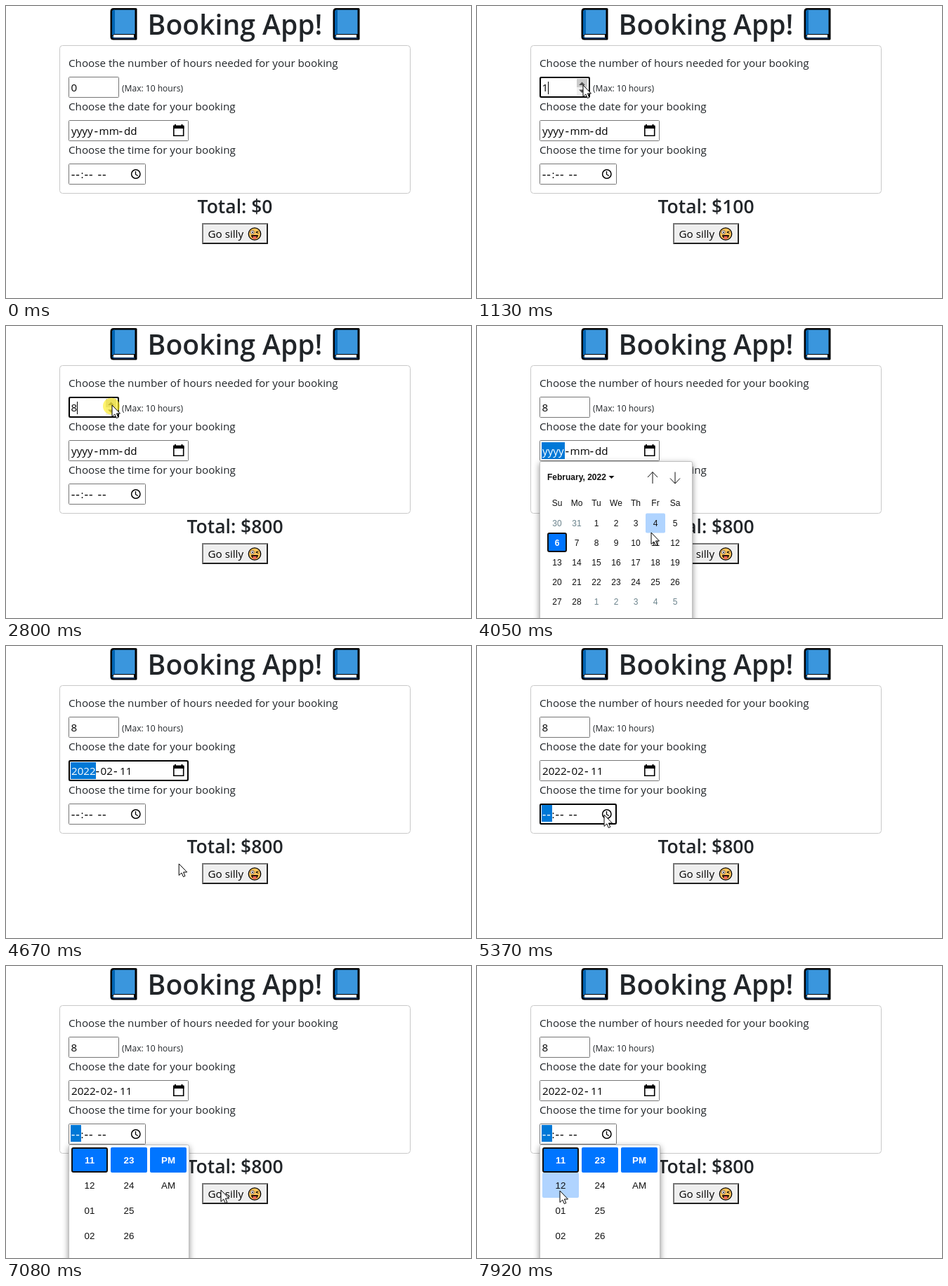
An HTML page for the animation above (7990 ms loop, 662 px wide and 417 px high).

```html
<!DOCTYPE html>
<html lang="en">
<head>
<meta charset="utf-8">
<title>Booking App</title>
<style>
  html, body { margin: 0; width: 100%; height: 100%; overflow: hidden; background: #fff; }
  svg { display: block; width: 100%; height: 100%; }
  text { font: 15.2px "Open Sans", "Noto Sans", sans-serif; fill: #212529; white-space: pre; }
  .head { font-weight: 600; text-anchor: middle; }
  .field { fill: #fff; stroke: #767676; }
  .ring { fill: none; stroke: #000; stroke-width: 2; }
  .value { fill: #000; }
  .picked { fill: #fff; }
  .dash { font-size: 17.5px; letter-spacing: .8px; }
  .pop text { font: 12px "Liberation Sans", Arial, sans-serif; fill: #101010; text-anchor: middle; }
  .pop .month { font-weight: bold; text-anchor: start; }
  .pop .dim { fill: #6b838c; }
  .pop .on { fill: #fff; font-weight: bold; }
  .pop .clock { font-size: 13.33px; }
</style>
</head>
<body>
<svg viewBox="0 0 662 417" preserveAspectRatio="none">
  <defs>
    <filter id="shade" x="-20%" y="-20%" width="140%" height="140%">
      <feDropShadow dx="0" dy="3" stdDeviation="4.5" flood-color="#000" flood-opacity=".45"/>
    </filter>
    <g id="book">
      <path d="M5 3H37Q38.500 3 38.500 4.500V47Q38.500 48.500 37 48.500H5Q.5 48.500 .5 44V8Q.5 3 5 3Z" fill="#000"/>
      <path d="M6 5.500H35.500V40H7Q4.500 40 3 42V9Q3 5.500 6 5.500Z" fill="#3a96dd"/>
      <path d="M6 5.500H7V40Q4.500 40 3 42V9Q3 5.500 6 5.500Z" fill="#0063b1"/>
      <path d="M6.500 41H34V45H6.500Q4.500 45 4.500 43T6.500 41Z" fill="#f2f2f2"/>
      <path d="M3.500 43Q4 46 7 46H35.500" fill="none" stroke="#0063b1" stroke-width="1.200"/>
    </g>
  </defs>

  <rect width="662" height="417" fill="#fff"/>
  <use href="#book" x="148"/>
  <use href="#book" x="465"/>
  <text class="head" x="326" y="41" style="font-size:39.1px">Booking App!</text>

  <rect x="76.500" y="56.500" width="499" height="211" rx="4" fill="#fff" stroke="#c9c9c9"/>
  <text x="89" y="87">Choose the number of hours needed for your booking</text>
  <text x="89" y="149">Choose the date for your booking</text>
  <text x="89" y="211">Choose the time for your booking</text>
  <text x="165" y="122" style="font-size:12.05px">(Max: 10 hours)</text>

  <rect class="field" x="89.500" y="101.500" width="71" height="29" rx="1"/>
  <rect class="field" x="89.500" y="163.500" width="170" height="29" rx="1"/>
  <rect class="field" x="89.500" y="225.500" width="109" height="29" rx="1"/>
  <rect id="ringNum" class="ring" x="90" y="102" width="70" height="28" rx="2"/>
  <rect id="ringDate" class="ring" x="90" y="164" width="169" height="28" rx="2"/>
  <rect id="ringTime" class="ring" x="90" y="226" width="108" height="28" rx="2"/>

  <text id="hours" class="value" x="92.500" y="122"></text>
  <path id="caret" d="M101.500 108V126" stroke="#000"/>
  <g id="spin">
    <rect x="142" y="104" width="15" height="24" fill="#efefef"/>
    <rect id="spinUp" x="142" y="104" width="15" height="12" fill="#cbcbcb"/>
    <path d="M145 113l4.500-4.500 4.500 4.500zM145 119.500l4.500 4.500 4.500-4.500z" fill="#505050"/>
  </g>

  <rect id="selDate" x="92" y="166" height="24" fill="#0078d7"/>
  <text id="year" class="value" x="93" y="184"></text>
  <g id="blankDate">
    <text class="value dash" x="125.500" y="184.500">-</text><text class="value" x="132.500" y="184">mm</text>
    <text class="value dash" x="160.500" y="184.500">-</text><text class="value" x="168" y="184">dd</text>
  </g>
  <g id="setDate">
    <text class="value dash" x="127.500" y="184.500">-</text><text class="value" x="134.500" y="184">02</text>
    <text class="value dash" x="153" y="184.500">-</text><text class="value" x="162" y="184">11</text>
  </g>
  <path d="M238.800 172.500H252.700V185.200H238.800Z" fill="none" stroke="#000" stroke-width="1.600"/>
  <path d="M238 170.500H253.500V175H238ZM240 169h2v2h-2zM249.500 169h2v2h-2z"/>

  <rect id="selTime" x="92" y="227" width="15" height="24" fill="#0078d7"/>
  <text id="hourDash" class="value dash" x="92.800" y="246.500">--</text>
  <text class="value" x="106.500" y="246">:</text>
  <text class="value dash" x="111.500" y="246.500">--</text>
  <text class="value dash" x="130.500" y="246.500">--</text>
  <circle cx="184.800" cy="240" r="6.200" fill="none" stroke="#000" stroke-width="1.500"/>
  <path d="M184.500 236V240.500L187.800 242.500" fill="none" stroke="#000" stroke-width="1.300"/>

  <text id="total" class="head" x="326" y="296" style="font-size:26.5px"></text>

  <rect x="279" y="310" width="94" height="30" fill="#efefef"/>
  <path d="M279 340V310H373L371 312H281V338Z" fill="#767676"/>
  <path d="M373 310V340H279L281 338H371V312Z" fill="#212121"/>
  <text class="value" x="287.500" y="331">Go silly</text>
  <g transform="translate(354 325.500)">
    <circle r="8.700" fill="#ffc45a" stroke="#000" stroke-width="1.300"/>
    <circle cx="-3.200" cy="-2.400" r="2.600" fill="#fff" stroke="#4a2b12" stroke-width=".7"/>
    <circle cx="-3" cy="-2.200" r="1" fill="#000"/>
    <path d="M1.800 -2.500L5.500 -3.800M1.800 -2.300L5.500 -1" stroke="#000" stroke-width="1"/>
    <path d="M-5 1.500H5Q5 6.500 0 6.500T-5 1.500Z" fill="#2a1608"/>
    <path d="M-2.500 3.500H2.500V6Q2.200 7.800 0 7.800T-2.500 6Z" fill="#f26a5a"/>
  </g>

  <g id="popDate" class="pop"></g>
  <g id="popTime" class="pop"></g>

  <circle id="click" r="12" fill="#ffee22" fill-opacity=".65"/>
  <path id="cursor" d="M0 0V16.500L3.800 13L6.300 18.600L8.800 17.500L6.400 12H11.500Z"
        fill="#fff" stroke="#000" stroke-linejoin="round"/>
</svg>
<script>
const LOOP = 7990;
const $ = id => document.getElementById(id);
const show = (id, on) => $(id).setAttribute("display", on ? "inline" : "none");
const within = (t, a, b) => t >= a && t < b;

// pointer path: time, x, y
const PATH = [
  [70, 554, 393], [770, 151, 113], [2930, 151, 113], [3360, 243, 178],
  [3630, 243, 178], [4050, 248, 295], [4250, 249, 328], [4390, 249, 315],
  [4600, 249, 314], [5180, 181, 241], [5440, 181, 241], [5980, 160, 268],
  [6120, 154, 317], [6400, 98, 305], [6880, 305, 318], [7080, 306, 320],
  [7500, 102, 300], [7710, 127, 327], [7920, 118, 321]
];
const STEPS = [870, 1260, 1400, 1590, 1800, 2130, 2400, 2800];
const CLICKS = [
  [800, 1060], [1260, 1330], [1400, 1530], [1590, 1670], [1800, 1860],
  [2130, 2200], [2400, 2530], [2800, 2930], [3360, 3500], [4460, 4600], [5230, 5300]
];
const T = { focusNum: 800, focusDate: 3400, openDate: 3470, pick: 4530, focusTime: 5300, openTime: 5440 };

function pointer(t) {
  const i = PATH.findIndex(p => p[0] > t);
  if (i < 0) return PATH[PATH.length - 1].slice(1);
  if (i === 0) return PATH[0].slice(1);
  const [a, ax, ay] = PATH[i - 1], [b, bx, by] = PATH[i];
  const u = (t - a) / (b - a), e = u * u * (3 - 2 * u);
  return [ax + (bx - ax) * e, ay + (by - ay) * e];
}

const rect = (x, y, w, h, more) => `<rect x="${x}" y="${y}" width="${w}" height="${h}" ${more}/>`;
const label = (x, y, s, cls = "") => `<text x="${x}" y="${y}" class="${cls}">${s}</text>`;
const panel = (y, w) =>
  rect(89.5, y, w, 300, 'rx="2" fill="#fff" stroke="#bfbfbf" filter="url(#shade)"');
const BLUE = 'rx="2" fill="#0075ff"';
const FRAMED = BLUE + ' stroke="#101010" stroke-width="2"';
const hover = (id, w, h) => rect(0, 0, w, h, `id="${id}" rx="2" fill="#b0d4ff"`);

function buildDate() {
  let s = panel(193.5, 217) + hover("dayHover", 28, 28);
  s += label(100, 220, "February, 2022", "month");
  s += '<path d="M187.500 214h8l-4 4z" fill="#101010"/>';
  s += '<path d="M250 225V208.500M243 216L250 208.500L257 216M282 208.500V225M275 217.500L282 225L289 217.500" fill="none" stroke="#101010"/>';
  "Su Mo Tu We Th Fr Sa".split(" ").forEach((d, i) => s += label(114 + 28 * i, 257, d));
  s += rect(101, 296, 26, 26, FRAMED);
  for (let i = 0; i < 42; i++) {
    const d = i - 1;
    const n = d < 1 ? d + 31 : d > 28 ? d - 28 : d;
    const cls = d === 6 ? "on" : d < 1 || d > 28 ? "dim" : "";
    s += label(114 + 28 * (i % 7), 286 + 28 * Math.floor(i / 7), n, cls);
  }
  $("popDate").innerHTML = s;
}

function buildTime() {
  let s = panel(255.5, 171) + hover("timeHover", 52, 36);
  s += rect(94, 260, 50, 34, FRAMED) + rect(149, 259, 52, 36, BLUE) + rect(205, 259, 52, 36, BLUE);
  const cols = [["11", "12", "01", "02", "03"], [23, 24, 25, 26, 27], ["PM", "AM"]];
  cols.forEach((col, c) => col.forEach((v, r) =>
    s += label(119 + 56 * c, 282 + 36 * r, v, r ? "clock" : "clock on")));
  $("popTime").innerHTML = s;
}

function place(id, on, x, y) {
  show(id, on);
  $(id).setAttribute("x", x);
  $(id).setAttribute("y", y);
}

function render(t) {
  const [x, y] = pointer(t);
  const [hx, hy] = pointer(t - 70); // hover trails the pointer
  const n = STEPS.filter(s => t >= s).length;
  const numFocus = within(t, T.focusNum, T.focusDate);
  const dateOpen = within(t, T.openDate, T.pick);
  const timeOpen = t >= T.openTime;
  const picked = t >= T.pick;
  const dateSel = within(t, T.focusDate, T.focusTime);
  const timeSel = t >= T.focusTime;

  $("hours").textContent = n;
  $("total").textContent = "Total: $" + n * 100;
  show("ringNum", numFocus);
  show("caret", numFocus);
  const overNum = within(x, 89, 161) && within(y, 101, 131);
  show("spin", numFocus || overNum);
  show("spinUp", within(x, 142, 157) && within(y, 104, 116));

  show("ringDate", dateSel && !dateOpen);
  show("selDate", dateSel);
  $("selDate").setAttribute("width", picked ? 36 : 33);
  $("year").textContent = picked ? "2022" : "yyyy";
  $("year").classList.toggle("picked", dateSel);
  show("blankDate", !picked);
  show("setDate", picked);

  show("ringTime", timeSel && !timeOpen);
  show("selTime", timeSel);
  $("hourDash").classList.toggle("picked", timeSel);

  show("popDate", dateOpen);
  const dc = Math.floor((hx - 100) / 28), dr = Math.floor((hy - 268) / 28);
  place("dayHover", dc >= 0 && dc < 7 && dr >= 0, 100 + 28 * dc, 268 + 28 * dr - 0.5);

  show("popTime", timeOpen);
  const tc = Math.floor((hx - 93) / 56), tr = Math.floor((hy - 259) / 36);
  const overTime = tc >= 0 && tc < 3 && tr > 0 && (tc < 2 || tr < 2) && hx - 93 - 56 * tc < 52;
  place("timeHover", overTime, 93 + 56 * tc, 259 + 36 * tr);

  show("click", CLICKS.some(c => within(t, c[0], c[1])));
  $("click").setAttribute("cx", x - 1);
  $("click").setAttribute("cy", y + 1.5);
  show("cursor", t >= 70);
  $("cursor").setAttribute("transform", `translate(${x} ${y})`);
}

buildDate();
buildTime();
const start = performance.now();
function tick() {
  render((performance.now() - start) % LOOP);
  requestAnimationFrame(tick);
}
render(0);
requestAnimationFrame(tick);
</script>
</body>
</html>
```
